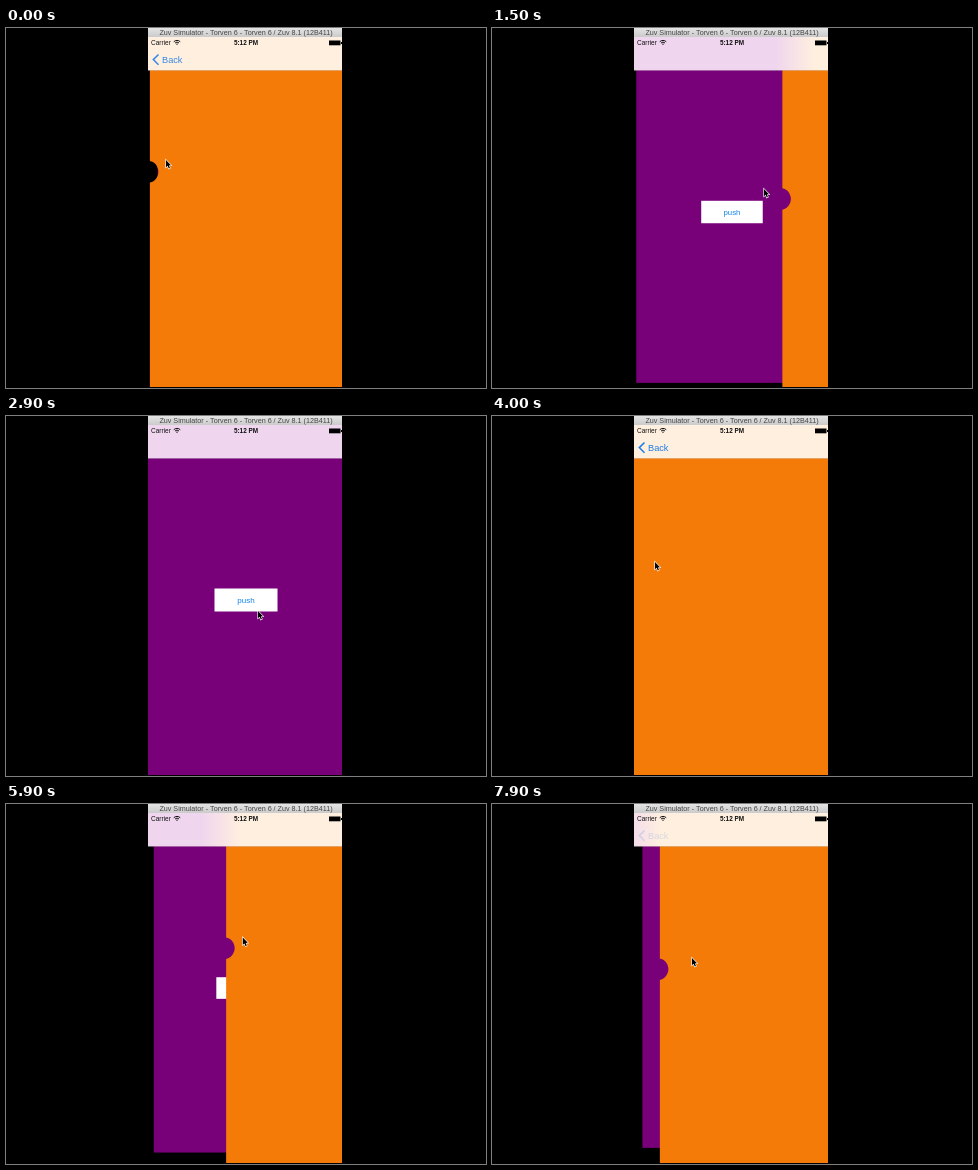
An HTML page with a canvas that plays this animation: 480x360 px, repeating every 8 s.

```html
<!DOCTYPE html>
<html lang="en">
<head>
<meta charset="utf-8">
<title>Swipe back transition</title>
<style>
html, body { margin: 0; width: 480px; height: 360px; overflow: hidden; background: #000; }
canvas { display: block; }
</style>
</head>
<body>
<canvas width="480" height="360"></canvas>
<script>
const g = document.querySelector('canvas').getContext('2d');
const LEFT = 142, WIDTH = 194, RIGHT = LEFT + WIDTH, BOTTOM = 359;
const ORANGE = '#f57b08', PURPLE = '#780078', CREAM = '#ffefdf', LILAC = '#efd5ee';
const SANS = '"Liberation Sans", Arial, sans-serif';
const LOOP = 8000, PUSH_START = 3100, PUSH_END = 3600;

// time, cursor x, cursor y, progress of the pop transition
const keys = [
  [0, 160, 132, .058], [1500, 272, 161, .685], [1900, 285, 165, 1],
  [2700, 252, 195, 1], [PUSH_START, 252, 195, 1], [PUSH_END, 240, 190, 0],
  [4000, 163, 146, 0], [4300, 148, 145, 0], [5300, 184, 148, .174],
  [6050, 250, 130, .5], [6400, 235, 123, 0], [6500, 231, 122, 0],
  [7200, 148, 150, 0], [7900, 200, 154, .229], [LOOP, 207, 155, .265]
];

function pose(t) {
  const i = keys.findIndex(k => k[0] > t);
  const a = keys[i - 1], b = keys[i], f = (t - a[0]) / (b[0] - a[0]);
  return a.map((v, n) => v + (b[n] - v) * f);
}

function rect(x, y, w, h, color) {
  g.fillStyle = color;
  g.fillRect(x, y, w, h);
}

function text(str, x, y, size, color, align = 'left', weight = 400) {
  g.font = `${weight} ${size}px ${SANS}`;
  g.textAlign = align;
  g.fillStyle = color;
  g.fillText(str, x, y);
}

function path(points) {
  g.beginPath();
  points.forEach(([x, y]) => g.lineTo(x, y));
}

function backPage(slide) {
  const scale = .9 + .1 * slide / WIDTH;
  g.save();
  g.translate(239, 184.5);
  g.scale(scale, scale);
  rect(-97, -174, WIDTH, 348.5, PURPLE);
  rect(-30.5, -12, 63, 23, '#fff');
  text('push', 1, 2.2, 8, '#1684e8', 'center');
  g.restore();
}

// Front page with a round notch that follows the finger
function frontPage(slide, notchY) {
  const edge = LEFT + slide;
  g.beginPath();
  g.moveTo(edge, 10);
  g.lineTo(RIGHT + WIDTH, 10);
  g.lineTo(RIGHT + WIDTH, BOTTOM);
  g.lineTo(edge, BOTTOM);
  if (notchY) {
    const angle = Math.acos(2.5 / 11);
    g.arc(edge - 2.5, notchY, 11, angle, -angle, true);
  }
  g.closePath();
  g.fillStyle = ORANGE;
  g.fill();
}

function navBar(slide) {
  const from = LEFT + slide * 1.25 - 45;
  const tint = g.createLinearGradient(from, 0, from + 40, 0);
  tint.addColorStop(0, LILAC);
  tint.addColorStop(1, CREAM);
  rect(LEFT, 9, WIDTH, 33.5, tint);
  rect(LEFT, 42, WIDTH, .5, 'rgba(0,0,0,.2)');

  g.globalAlpha = Math.exp(-slide / 15);
  text('Back', 156, 34.6, 9.2, '#1b7ce5');
  path([[152.5, 26.5], [147.3, 31.6], [152.5, 36.7]]);
  g.strokeStyle = '#1b7ce5';
  g.lineWidth = 1.5;
  g.stroke();
  g.globalAlpha = 1;
}

function statusBar() {
  const bar = g.createLinearGradient(0, 0, 0, 9);
  bar.addColorStop(0, '#e4e4e4');
  bar.addColorStop(1, '#cbcbcb');
  rect(LEFT, 0, WIDTH, 9, bar);
  text('Zuv Simulator - Torven 6 - Torven 6 / Zuv 8.1 (12B411)', 240, 6.7, 7.2, '#444', 'center');
  text('Carrier', 145, 17.3, 6.5, '#111');
  text('5:12 PM', 240, 17.3, 6.4, '#111', 'center', 700);
  g.strokeStyle = '#111';
  g.lineWidth = 1;
  for (const r of [1, 2.8, 4.6]) {
    g.beginPath();
    g.arc(171, 17, r, -Math.PI * .75, -Math.PI * .25);
    g.stroke();
  }
  rect(323, 12.5, 11.5, 4.8, '#000');
  rect(335, 14, 1, 2, '#000');
}

function cursor(x, y) {
  g.save();
  g.translate(x, y);
  path([[0, 0], [0, 7.2], [1.6, 5.8], [2.8, 8.6], [4, 8], [2.9, 5.4], [5, 5.2]]);
  g.closePath();
  g.strokeStyle = '#fff';
  g.lineWidth = 1.2;
  g.stroke();
  g.fillStyle = '#000';
  g.fill();
  g.restore();
}

function draw(now) {
  const t = Math.floor(now % LOOP / 100) * 100;
  const [, x, y, p] = pose(t);
  const slide = WIDTH * p * p * (3 - 2 * p);
  const pushing = t >= PUSH_START && t <= PUSH_END;

  rect(0, 0, 480, 360, '#000');
  g.save();
  g.beginPath();
  g.rect(LEFT, 0, WIDTH, 360);
  g.clip();
  backPage(slide);
  frontPage(slide, p > 0 && !pushing ? y + 12 - p * 3 : 0);
  navBar(slide);
  statusBar();
  g.restore();
  cursor(x, y);
}

const start = performance.now();
function loop() {
  draw(performance.now() - start);
  requestAnimationFrame(loop);
}
loop();
</script>
</body>
</html>
```
